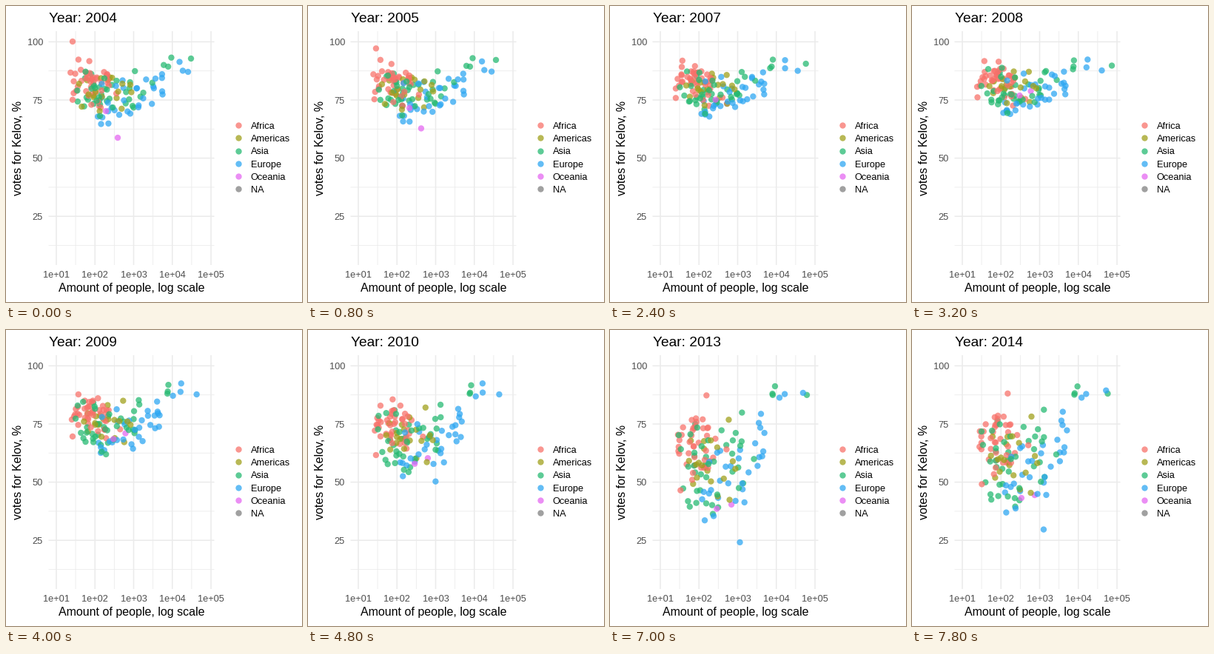
These frames come from a looping animation (400x400 px, 8000 ms). A matplotlib script:

```python
import numpy as np
import matplotlib.pyplot as plt
from matplotlib.animation import FuncAnimation

SIZE, DPI = 400, 100
FRAMES, STEP_MS = 40, 200
YEARS_PER_FRAME = 14 / 55
KEY_YEARS = [0, 4, 8, 14]

COLORS = {
    "Africa": "#F8716A",
    "Americas": "#9FA01A",
    "Asia": "#25B971",
    "Europe": "#2CA6F2",
    "Oceania": "#E467F1",
    "NA": "#7F7F7F",
}
DOT = dict(s=36, linewidths=0, alpha=0.74)

# Per group: count, x range as (left, mode, right), starting level, later drop
GROUPS = {
    "Africa": (44, (72, 100, 158), 108, 54),
    "Americas": (19, (78, 112, 195), 118, 72),
    "Asia": (46, (82, 125, 236), 121, 68),
    "Europe": (34, (106, 145, 250), 131, 80),
}
# Share of the drop reached and spread of the levels at the key years
FALL = np.array([0, -0.1, 1, 0.4])
SPREAD = np.array([19, 17, 33, 24])

# A few dots that stand apart, placed at the key years
ANCHORS = [
    ("Asia", [(250, 71), (271, 81), (267, 89), (258, 78)]),
    ("Europe", [(246, 89), (257, 87), (260, 87), (268, 68)]),
    ("Europe", [(153, 147), (171, 124), (174, 298), (188, 196)]),
    ("Africa", [(90, 48), (100, 97), (131, 90), (125, 75)]),
    ("Oceania", [(151, 178), (161, 112), (163, 244), (173, 169)]),
    ("Oceania", [(135, 142), (146, 120), (142, 251), (163, 165)]),
]


def random_path(rng, x_range, level, drop):
    x = rng.triangular(*x_range)
    # populous places, far right, start higher and hardly fall
    reach = np.clip((225 - x) / 40, 0, 1)
    start = level - 0.65 * max(x - 165, 0)
    z = 0.8 * rng.normal() + 0.6 * rng.normal(size=4)
    z[3] = z[2]
    z = np.clip(z, -2, 2)
    y = start + drop * reach * FALL + SPREAD * (0.4 + 0.6 * reach) * z
    return np.column_stack([x + rng.normal(0, 3, 4), np.maximum(y, 62)])


def build_dots():
    rng = np.random.default_rng(7)
    dots = [(name, np.array(path)) for name, path in ANCHORS]
    for name, (count, *shape) in GROUPS.items():
        dots += [(name, random_path(rng, *shape)) for _ in range(count)]
    shown = rng.random((len(dots), 3)) < 0.95
    shown[:len(ANCHORS)] = True
    shown[0, 1] = False
    order = rng.permutation(len(dots))
    colors = [COLORS[dots[i][0]] for i in order]
    return colors, np.array([dots[i][1] for i in order], float), shown[order]


def dots_at(year):
    span = np.searchsorted(KEY_YEARS, year, side="right") - 1
    a, b = KEY_YEARS[span:span + 2]
    w = (year - a) / (b - a)
    pos = paths[:, span] * (1 - w) + paths[:, span + 1] * w
    pos[~shown[:, span]] = np.nan
    return pos


def label(x, y, text, px, color="black", **kw):
    return ax.text(x, y, text, fontsize=px * 72 / DPI, color=color, **kw)


def grid(xs, ys, px):
    style = dict(color="#EBEBEB", linewidth=px * 72 / DPI, zorder=0, snap=False)
    ax.vlines(xs, 34, 350, **style)
    ax.hlines(ys, 57.5, 281.5, **style)


plt.rcParams["font.family"] = "Liberation Sans"
fig = plt.figure(figsize=(SIZE / DPI, SIZE / DPI), dpi=DPI, facecolor="white")
ax = fig.add_axes([0, 0, 1, 1])
ax.axis("off")

x_ticks = 68 + 52.25 * np.arange(5)
y_ticks = 48.4 + 78.6 * np.arange(4)
grid(x_ticks[:-1] + 26.1, y_ticks + 39.3, 0.8)
grid(x_ticks, y_ticks, 1.55)

for i, x in enumerate(x_ticks):
    label(x, 367, f"1e+0{i + 1}", 12.8, "#4D4D4D", ha="center")
for i, y in enumerate(y_ticks):
    label(50, y + 4.6, str(100 - 25 * i), 12.8, "#4D4D4D", ha="right")
label(169.5, 386, "Amount of people, log scale", 16, ha="center")
label(24, 192, "votes for Kelov, %", 16, ha="right", va="center", rotation=90)
title = label(57.5, 22, "", 19.2)

for i, (name, color) in enumerate(COLORS.items()):
    y = 161 + 17.28 * i
    ax.scatter([314], [y], color=color, **DOT)
    label(330.5, y + 4.8, name, 12.8)

dot_colors, paths, shown = build_dots()
dots = ax.scatter(paths[:, 0, 0], paths[:, 0, 1], c=dot_colors, zorder=2, **DOT)
ax.set(xlim=(0, SIZE), ylim=(SIZE, 0))


def update(frame):
    year = max(frame - 1, 0) * YEARS_PER_FRAME
    dots.set_offsets(dots_at(year))
    title.set_text(f"Year: {2004 + round(year)}")
    return dots, title


anim = FuncAnimation(fig, update, frames=FRAMES, interval=STEP_MS,
                     repeat=True, repeat_delay=0)
plt.show()
```
